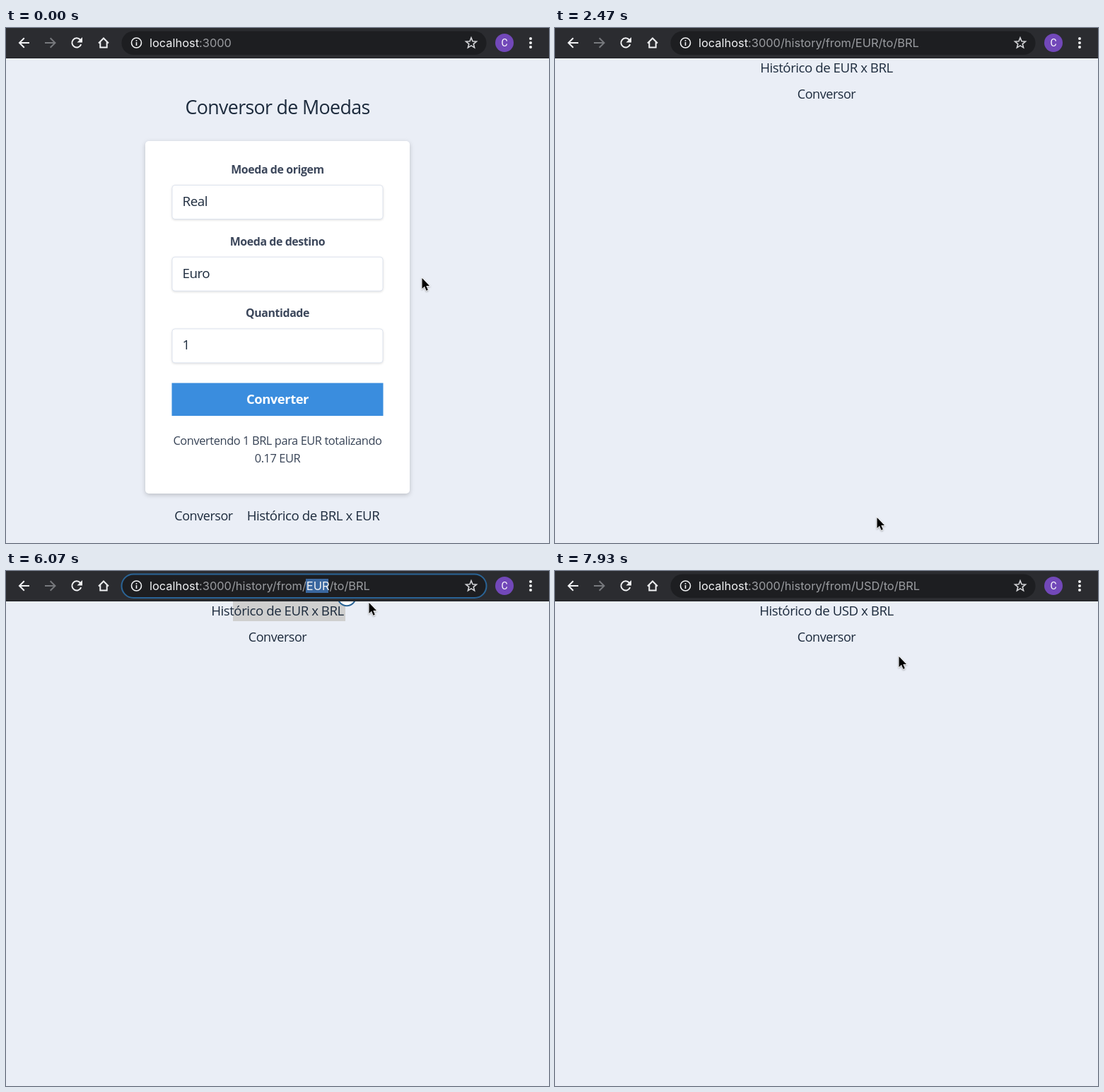
Write an HTML page that moves like this. It is 768 px wide and 729 px high and loops after 8 s.

```html
<!DOCTYPE html>
<html lang="pt-BR">
<head>
<meta charset="utf-8">
<title>Conversor de Moedas</title>
<style>
  html, body { margin: 0; width: 100%; height: 100%; overflow: hidden; background: #eaeef6; }
  svg { display: block; width: 100%; height: 100%; }
  .page text { font-family: "Open Sans", "Noto Sans", sans-serif; font-weight: 500; letter-spacing: -.025em; fill: #1d2b3d; }
  .mid { text-anchor: middle; }
  .page .label { font-size: 15.9px; font-weight: 700; fill: #3c475b; }
  .page .action { font-size: 18.4px; font-weight: 700; fill: #fff; }
  .page .value { font-size: 18.8px; }
  .page .note { font-size: 16.4px; fill: #364255; }
  .title { font-size: 26.8px; }
  .link { font-size: 18.7px; }
  .home { font-size: 18px; }
  .url { font: 16.4px Inter, Roboto, sans-serif; fill: #9a9ca0; white-space: pre; }
  .url .host { fill: #f1f2f4; }
  .popup .url { fill: #8ab4f8; }
  .line { fill: none; stroke: #f1f2f4; stroke-width: 2; }
  .thin { stroke-width: 1.6; }
  .field { fill: #fff; stroke: #dde3ee; filter: drop-shadow(0 1.5px 1.5px #0002); }
</style>
</head>
<body>
<svg viewBox="0 0 768 729" preserveAspectRatio="none">
  <rect width="768" height="729" fill="#eaeef6"/>

  <g id="form" class="page">
    <text class="mid title" x="384" y="121.5">Conversor de Moedas</text>
    <rect x="197" y="160" width="374" height="499" rx="5" fill="#fff" style="filter:drop-shadow(0 2px 3px #0003)"/>
    <g id="fields"></g>
    <rect x="234.5" y="502.5" width="299" height="46.5" fill="#3a8dde"/>
    <text class="mid action" x="384" y="531.5">Converter</text>
    <text class="mid note" x="384" y="590">Convertendo 1 BRL para EUR totalizando</text>
    <text class="mid note" x="384" y="614.5">0.17 EUR</text>
    <text class="mid home" x="279.5" y="697">Conversor</text>
    <text class="mid link" x="434.5" y="697">Histórico de BRL x EUR</text>
  </g>

  <g id="history" class="page">
    <rect id="mark" y="43" height="28"/>
    <text class="mid link" x="384" y="63">Histórico de <tspan id="base">EUR</tspan> x BRL</text>
    <text class="mid home" x="384" y="100">Conversor</text>
    <circle id="badge" cx="482" cy="36.5" r="12.7" fill="#fff" stroke="#2a6496" stroke-width="2"/>
  </g>

  <rect width="768" height="43" fill="#2b2c30"/>
  <rect y="42" width="768" height="1" fill="#1f2023"/>

  <g id="popup" class="popup">
    <rect x="158" y="-10" width="525" height="136" rx="8" fill="#292a2d" style="filter:drop-shadow(0 3px 5px #0005)"/>
    <rect x="158" y="43" width="525" height="40" fill="#3c4043"/>
    <g class="line thin">
      <circle cx="184" cy="63" r="7"/><path d="M177 63H191"/>
      <circle cx="184" cy="104" r="7"/><path d="M177 104H191"/>
    </g>
    <text class="url" x="217" y="69">localhost:3000/history/from/<tspan id="hint"></tspan>/to/BRL</text>
    <text class="url" x="217" y="110">localhost:3000/history/from/EUR/to/BRL</text>
  </g>

  <rect id="pill" x="163.5" y="4.5" width="516" height="33.5" rx="16.75" stroke-width="2"/>
  <rect id="pick" y="11" height="20" fill="#3a679f"/>
  <text class="url" x="203" y="27"><tspan class="host">localhost</tspan>:3000<tspan id="path">/history/from/<tspan id="slug"></tspan>/to/BRL</tspan></text>

  <g class="line">
    <path d="M33 21H19.5M25.8 14.2L19 21L25.8 27.8"/>
    <path d="M55 21H69M62.7 14.2L69.5 21L62.7 27.8" stroke="#77797d"/>
    <g id="reload">
      <path d="M106.2 23.2A6.6 6.6 0 1 1 104.9 16.5L106 17.7"/>
      <path d="M108 13V20.5H100.5Z" fill="#f1f2f4" stroke="none"/>
    </g>
    <path id="stop" d="M93.5 14.5L106.5 27.5M106.5 14.5L93.5 27.5"/>
    <path d="M131 21.5L138 14.5L145 21.5M133.3 20V27.5H142.7V20"/>
    <g class="thin">
      <circle cx="184.5" cy="21" r="7"/>
      <path d="M184.5 20V25M184.5 17V18.7"/>
      <path id="star" stroke="#d4d5d8"/>
    </g>
  </g>
  <circle cx="705" cy="21" r="13" fill="#7248b9"/>
  <text class="mid" x="705" y="26" font-size="14" font-family="Roboto, sans-serif" fill="#fff">C</text>
  <g fill="#f1f2f4"><circle cx="742" cy="15" r="2"/><circle cx="742" cy="21" r="2"/><circle cx="742" cy="27" r="2"/></g>

  <g id="key">
    <rect x="344" y="588.5" width="80" height="64" rx="12" fill="#444548" stroke="#333437" style="filter:drop-shadow(0 4px 6px #0005)"/>
    <text id="letter" class="mid" x="384" y="630" font-size="28" font-family="Inter, sans-serif" fill="#fff"></text>
    <g id="enter">
      <path class="line" d="M386.5 610.5H389.5A4.6 4.6 0 0 1 389.5 619.7H379"/>
      <path d="M373 619.7L381 613.8V625.6Z" fill="#fff"/>
    </g>
  </g>

  <g id="cursor">
    <g id="ring" fill="none">
      <circle r="19.5" stroke="#fff" stroke-width="4"/>
      <circle r="18.8" stroke="#111" stroke-width="1.8"/>
    </g>
    <path id="arrow" d="M.5 0V15L4 11.8L6.5 17.8L8.8 16.8L6.300 11H11Z" stroke="#fff" stroke-width="1.4" paint-order="stroke" style="filter:drop-shadow(0 1.5px 1px #0005)"/>
    <path id="hand" d="M-2 1Q0 -1 2 1V8Q4 6 5.5 8Q8 7 8.5 9Q11 8.5 11 11V15L9 20H-1L-6 12Q-5 9 -2 12Z" fill="#111" stroke="#fff" stroke-width="1.3"/>
    <g id="beam" fill="none" stroke-linecap="round"></g>
  </g>
</svg>
<script>
const LOOP = 8000, STEP = 1000 / 15;
const $ = id => document.getElementById(id);
const show = (id, on) => { $(id).style.display = on ? '' : 'none'; };
const within = (t, a, b) => t >= a && t < b;

$('fields').innerHTML = [['Moeda de origem', 'Real'], ['Moeda de destino', 'Euro'], ['Quantidade', '1']]
  .map(([label, value], i) => {
    const y = i * 101.7;
    return `<text class="mid label" x="384" y="${206 + y}">${label}</text>
      <rect class="field" x="235" y="${222.5 + y}" width="298" height="48" rx="4"/>
      <text class="value" x="249.5" y="${252 + y}">${value}</text>`;
  }).join('');

$('star').setAttribute('d', 'M' + Array.from({ length: 10 }, (_, i) => {
  const r = i % 2 ? 3.4 : 7.8, a = i * Math.PI / 5;
  return `${(658 + r * Math.sin(a)).toFixed(2)} ${(21.5 - r * Math.cos(a)).toFixed(2)}`;
}).join('L') + 'Z');

$('beam').innerHTML = [['#fff', 3], ['#111', 1.3]].map(([color, width]) =>
  `<path d="M-3 -9Q0 -9 0 -6Q0 -9 3 -9M0 -6V6M-3 9Q0 9 0 6Q0 9 3 9M-2 3H2" stroke="${color}" stroke-width="${width}"/>`
).join('');

// time, x, y of the pointer
const route = [
  [0, 588, 354], [267, 588, 354], [533, 628, 380], [600, 628, 380], [666, 588, 354], [867, 588, 354],
  [1000, 570, 430], [1133, 530, 565], [1333, 493, 653], [1533, 466, 703], [1733, 455, 693],
  [2667, 455, 693], [2933, 470, 520], [3200, 500, 260], [3533, 505, 80], [3800, 490, 68],
  [4000, 478, 56], [4133, 458, 55], [4200, 427, 55], [4400, 321, 56], [4600, 330, 56],
  [4933, 420, 40], [5200, 440, 22], [5600, 446, 21], [5733, 513, 45], [7400, 513, 45],
  [7733, 548, 152], [7800, 548, 152], [7933, 486, 121]
];
const clicks = [[2330, 2400], [4000, 4400], [5200, 5270], [5330, 5470]];
const at = { page: 2400, focus: 5200, word: 5330, type: 6330, enter: 6930, loaded: 7260 };

function pointer(t) {
  const i = route.findIndex(p => p[0] > t);
  if (i < 0) return route[route.length - 1].slice(1);
  const [t0, x0, y0] = route[i - 1], [t1, x1, y1] = route[i];
  const k = (t - t0) / (t1 - t0);
  return [x0 + (x1 - x0) * k, y0 + (y1 - y0) * k];
}

// last value whose time has come
const latest = (t, table) => table.reduce((v, [when, next]) => t >= when ? next : v, null);

function span(id, from, to) {
  show(id, from != null);
  if (from == null) return;
  $(id).setAttribute('x', from);
  $(id).setAttribute('width', to - from);
}

function render(ms) {
  const t = Math.floor((ms + 5) / STEP) * STEP + 1;
  const history = t >= at.page;
  const focus = within(t, at.focus, at.enter);
  const typing = within(t, at.type, at.enter);
  const loading = within(t, at.enter, at.loaded);

  show('form', !history);
  show('history', history);
  show('path', history);
  $('base').textContent = t < at.loaded ? 'EUR' : 'USD';
  span('mark', t < at.loaded ? latest(t, [[4130, 470], [4260, 440], [4330, 380], [4400, 321]]) : null, 480);
  $('mark').setAttribute('fill', focus ? '#cfcfcf' : '#a3cdfa');
  show('badge', within(t, 4470, 7130));

  const slug = latest(t, [[0, 'EUR'], [at.type, 'U'], [6400, 'US'], [6530, 'USD']]);
  $('slug').textContent = $('hint').textContent = slug;
  $('slug').style.fill = within(t, at.word, at.type) ? '#f1f2f4' : '';
  span('pick', within(t, at.focus, at.type) ? (t < at.word ? 203 : 424) : null, t < at.word ? 514 : 456);
  $('pill').setAttribute('stroke', focus && !typing ? '#2a6496' : 'none');
  $('pill').setAttribute('fill', typing ? '#292a2d' : '#1d1e21');
  $('popup').style.opacity = typing ? 1 : latest(t, [[0, 0], [at.enter, .4], [7000, .02], [7130, 0]]);

  show('reload', !loading);
  show('stop', loading);

  show('key', within(t, at.type, 7730));
  $('key').style.opacity = Math.min(1, Math.max(0, (7734 - t) / 330));
  $('letter').textContent = typing ? slug.slice(-1) : '';
  show('enter', t >= at.enter);

  const [x, y] = pointer(t);
  const hand = history ? Math.abs(x - 384) < 42 && Math.abs(y - 94) < 14
                       : y > 680 && x > 339 && x < 531;
  const beam = history && (x > 288 && x < 480 && y > 45 && y < 71 || y < 38);
  $('cursor').setAttribute('transform', `translate(${x.toFixed(1)} ${y.toFixed(1)})`);
  show('hand', hand);
  show('beam', beam);
  show('arrow', !hand && !beam);
  show('ring', clicks.some(([a, b]) => within(t, a, b)));
}

function tick() {
  render(performance.now() % LOOP);
  requestAnimationFrame(tick);
}
tick();
</script>
</body>
</html>
```
